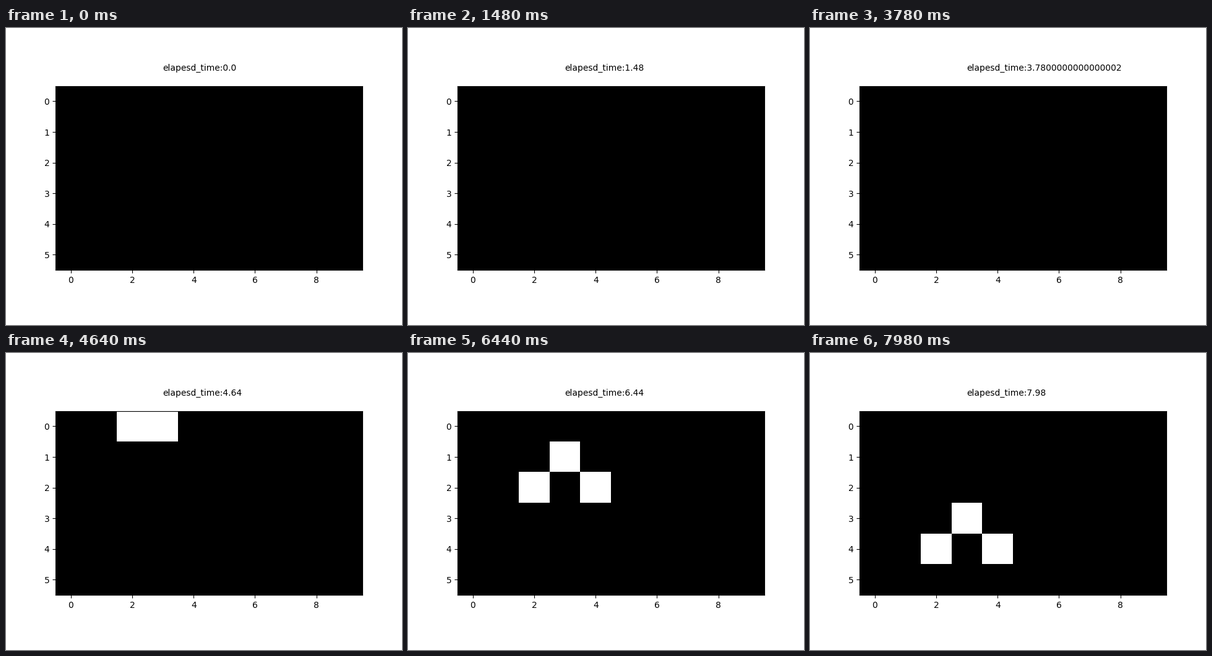
A matplotlib script that plays this animation: 640x480 px, repeating every 8 s.

```python
import numpy as np
import matplotlib.pyplot as plt
from matplotlib.animation import FuncAnimation

STEP_MS = 20
FRAMES = 400
ROWS, COLS = 6, 10
MIDDLE = 3       # column the group gathers around
ENTRY_MS = 4120  # first walker of the group enters
GAP_MS = 480     # time between walkers
ROW_MS = 800     # time a walker spends in one row
SIDE_MS = 220    # time per column for the sideways mover


def walk_down(grid, ms):
    """Right, left and middle walkers enter in turn and step down the rows."""
    for k, side in enumerate((1, -1, 0)):
        row = (ms - ENTRY_MS - k * GAP_MS) // ROW_MS
        if 0 <= row < ROWS:
            # the right walker only spreads out after the first row
            grid[row, MIDDLE + (side if row else min(side, 0))] = 1


def walk_aside(grid, ms):
    """One light crosses the top row to the left."""
    step = (ms - 2600) // SIDE_MS
    if 0 <= step <= 2:
        grid[0, MIDDLE + 2 - step] = 1


def leave(grid, ms):
    """A light goes out at the bottom edge."""
    if 200 <= ms < 600:
        grid[ROWS - 1, MIDDLE - 1] = 1


def grid_at(ms):
    grid = np.zeros((ROWS, COLS))
    for draw in (leave, walk_aside, walk_down):
        draw(grid, ms)
    return grid


fig, ax = plt.subplots(figsize=(6.4, 4.8), dpi=100)
image = ax.imshow(grid_at(0), cmap="gray", vmin=0, vmax=1)
label = ax.text(MIDDLE, -1, "")


def update(i):
    image.set_data(grid_at(i * STEP_MS))
    label.set_text(f"elapesd_time:{i * 0.02}")
    return image, label


anim = FuncAnimation(fig, update, frames=FRAMES, interval=STEP_MS,
                     repeat=True, repeat_delay=0, blit=False)
plt.show()
```
